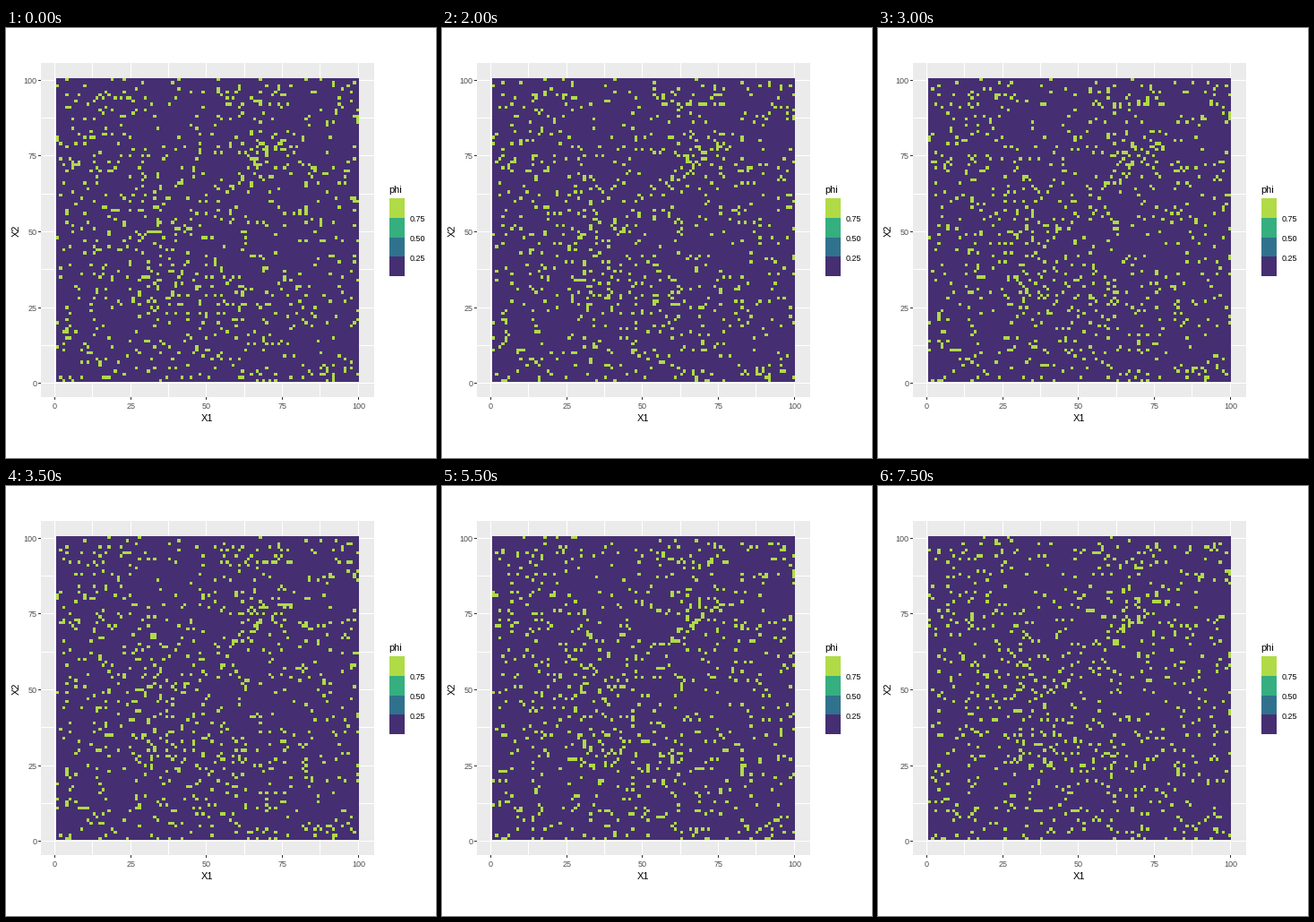
A matplotlib script that plays this animation: 480 by 480 pixels, repeating every 8 s.

```python
import numpy as np
import matplotlib.pyplot as plt
from matplotlib.animation import FuncAnimation
from matplotlib.colors import ListedColormap
from matplotlib.patches import Rectangle

SIZE, N, WALKERS, STEPS = 480, 100, 820, 16
DARK, BLUE, TEAL, LIME = "#452F72", "#30728D", "#35AF7F", "#B0DB46"
X0, Y0, UNIT = 54.65, 396.65, 3.384
LEFT, RIGHT, TOP, BOTTOM = 39, 411, 39, 412

# Soft crowding: column, row, radius, weight
CROWDS = [(56, 89, 5, 0.8), (63, 74, 5, 0.8), (75, 76, 4, 0.5),
          (33, 53, 6, 0.5), (23, 67, 6, 0.5), (6, 13, 6, 0.5),
          (57, 12, 5, 0.6), (90, 3, 4, 0.9), (33, 31, 5, 0.4),
          (44, 85, 6, -0.4), (52, 45, 5, -0.3)]


def px(v):
    return X0 + UNIT * v


def py(v):
    return Y0 - UNIT * v


def start(rng):
    row, col = np.mgrid[1:N + 1, 1:N + 1]
    weight = np.ones((N, N))
    for cx, cy, r, w in CROWDS:
        weight += w * np.exp(-((col - cx) ** 2 + (row - cy) ** 2) / (2 * r * r))
    weight = weight.ravel()
    grid = np.zeros(N * N, dtype=int)
    grid[rng.choice(N * N, WALKERS, replace=False, p=weight / weight.sum())] = 1
    return grid.reshape(N, N)


def walk(grid, rng):
    """Move about half of the walkers to a free neighbouring cell."""
    grid = grid.copy()
    cells = np.argwhere(grid)
    rng.shuffle(cells)
    for r, c in cells:
        if rng.random() < 0.5:
            dr, dc = [(0, 1), (0, -1), (1, 0), (-1, 0)][rng.integers(4)]
            nr, nc = r + dr, c + dc
            if 0 <= nr < N and 0 <= nc < N and not grid[nr, nc]:
                grid[r, c], grid[nr, nc] = 0, 1
    return grid


rng = np.random.default_rng(21)
grids = [start(rng)]
while len(grids) < STEPS:
    grids.append(walk(grids[-1], rng))

plt.rcParams["font.family"] = "Liberation Sans"
fig = plt.figure(figsize=(SIZE / 100, SIZE / 100), dpi=100, facecolor="white")
ax = fig.add_axes([0, 0, 1, 1])


def box(x, y, w, h, color):
    ax.add_patch(Rectangle((x, y), w, h, fc=color, lw=0, antialiased=False))


def text(x, y, s, size=9, color="black", **kw):
    kw = {"ha": "center", "va": "baseline", **kw}
    ax.text(x, y, s, fontsize=size * 0.72, color=color, **kw)


box(LEFT, TOP, RIGHT - LEFT, BOTTOM - TOP, "#EBEBEB")
for v in np.arange(0, 101, 12.5):
    gx, gy = int(px(v)), int(py(v))
    box(gx, TOP, 1, BOTTOM - TOP, "white")
    box(LEFT, gy, RIGHT - LEFT, 1, "white")
    if v % 25 == 0:
        box(gx, BOTTOM, 1, 3, "#333333")
        box(LEFT - 3, gy, 3, 1, "#333333")
        text(gx + 0.5, 425, f"{v:.0f}", color="#4D4D4D")
        text(34.5, gy + 4, f"{v:.0f}", color="#4D4D4D", ha="right")

text(224.5, 439, "X1", 11)
text(11.5, 226, "X2", 11, rotation=90, va="center")

text(427.5, 184.5, "phi", 11, ha="left")
edges = [190, 212, 234, 255, 277]
for y, end, color in zip(edges, edges[1:], [LIME, TEAL, BLUE, DARK]):
    box(428, y, 17, end - y, color)
for y, label in zip(edges[1:4], ["0.75", "0.50", "0.25"]):
    text(451, y + 4.5, label, ha="left")

field = ax.imshow(grids[0], cmap=ListedColormap([DARK, LIME]), vmin=0, vmax=1,
                  extent=[56, 394, 395, 56], origin="lower",
                  interpolation="nearest", aspect="auto", zorder=3)

ax.set_xlim(0, SIZE)
ax.set_ylim(SIZE, 0)
ax.axis("off")


def update(i):
    field.set_data(grids[i])
    return [field]


anim = FuncAnimation(fig, update, frames=STEPS, interval=500,
                     repeat=True, repeat_delay=0)
plt.show()
```
